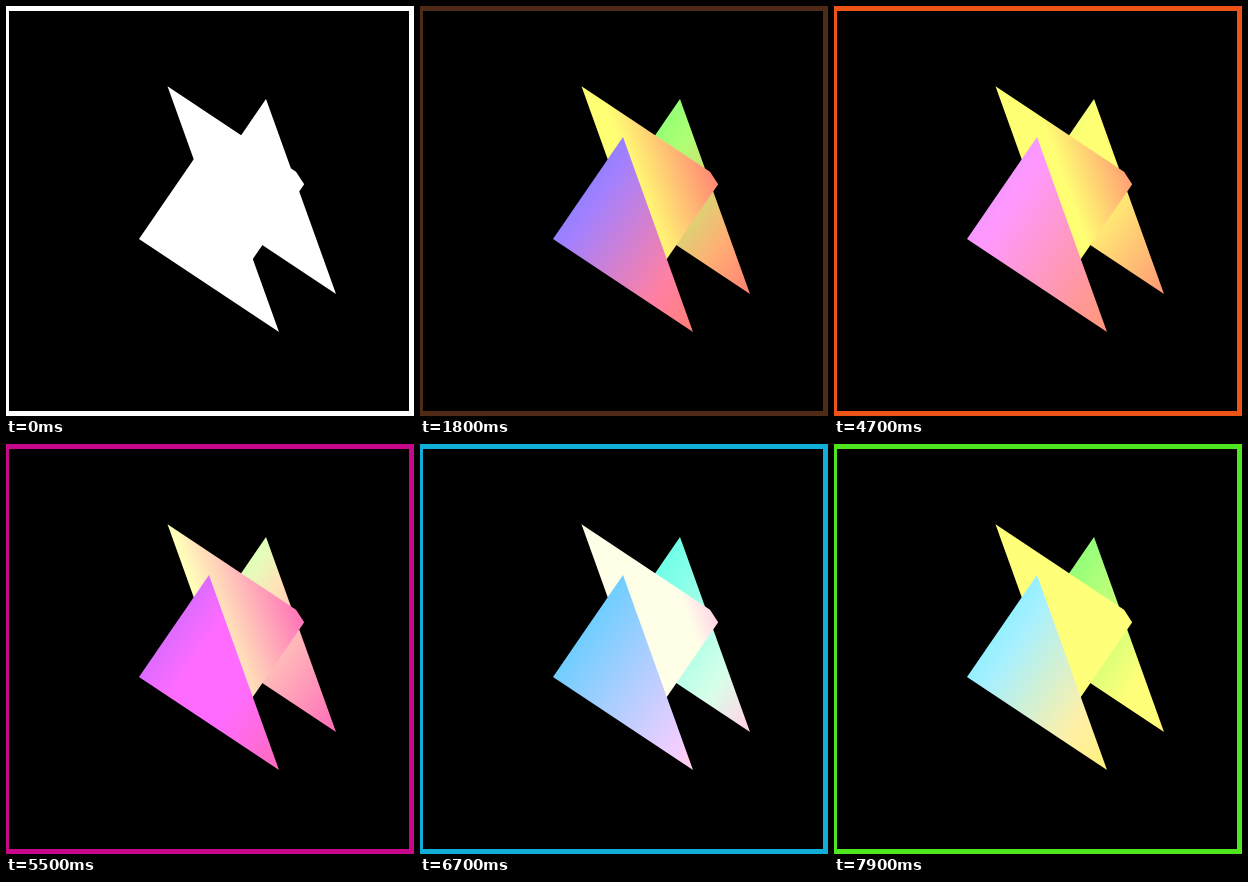
These frames come from a looping animation (408x410 px, 8000 ms). An HTML page with a canvas:

```html
<!DOCTYPE html>
<html lang="en">
<head>
<meta charset="utf-8">
<title>Tinted triangles</title>
<style>
html, body { margin: 0; width: 100%; height: 100%; overflow: hidden; }
canvas { display: block; }
</style>
</head>
<body>
<canvas id="stage" width="408" height="410"></canvas>
<script>
const ctx = document.getElementById('stage').getContext('2d');
const LOOP = 8000, TICK = 100;

// Bursts of tint changes: [start ms, number of ticks]
const bursts = [[1100, 4], [2300, 5], [4700, 4], [5500, 5], [6200, 4], [6700, 5], [7800, 2]];

// Tint by tick count: [tick, hue, saturation, value]
const tints = [
  [0, 21, 0, 1],
  [4, 21, 0.71, 0.31],
  [9, 23, 0.946, 0.87],
  [10, 16.5, 0.9, 0.933],
  [14, -41, 0.96, 0.784],
  [23, -167.2, 0.926, 0.85],
  [29, -254, 0.865, 0.902]
];

const GREEN = [0.4, 1, 0.4], YELLOW = [1, 1, 0.4], BLUE = [0.4, 0.4, 1], RED = [1, 0.4, 0.4];

// Orthographic view of model space
const project = (x, y, z) => [203 + 140 * x - 142.5 * z, 205.25 + 93 * x - 148.5 * y + 95 * z];

// Two corners share a colour, the last one is the red tip
const triangle = (z, color, pts) => ({ color, pts: pts.map(([x, y]) => project(x, y, z)) });
const triangles = [
  triangle(-0.4, GREEN, [[0, 0.5], [-0.5, -0.5], [0.5, -0.5]]),
  triangle(-0.2, YELLOW, [[-0.5, 0.4], [0, -0.6], [0.5, 0.4]]),
  triangle(0, BLUE, [[0, 0.5], [-0.5, -0.5], [0.5, -0.5]])
];

// The near plane cuts off the tip of the middle triangle
const [m0, m1] = triangles[1].pts;
triangles[1].outline = [m0, m1, [298.2, 178.2], [290, 165.7]];

const mix = (a, b, k) => a + (b - a) * k;

function ticksAt(t) {
  return bursts.reduce((n, [start, count]) =>
    n + Math.max(0, Math.min(count, Math.floor((t - start) / TICK) + 1)), 0);
}

function hsv(h, s, v) {
  return [5, 3, 1].map(n => {
    const k = (((n + h / 60) % 6) + 6) % 6;
    return v - v * s * Math.max(0, Math.min(k, 4 - k, 1));
  });
}

function tintAt(tick) {
  const i = Math.max(1, tints.findIndex(key => key[0] >= tick));
  const a = tints[i - 1], b = tints[i];
  const k = (tick - a[0]) / (b[0] - a[0]);
  return hsv(...[1, 2, 3].map(c => mix(a[c], b[c], k)));
}

const css = rgb => `rgb(${rgb.map(c => Math.round(255 * Math.min(1, c))).join(',')})`;

function drawTriangle({ color, pts, outline = pts }, tint) {
  const [a, b, tip] = pts;
  const ex = b[0] - a[0], ey = b[1] - a[1];
  const k = ((tip[0] - a[0]) * ex + (tip[1] - a[1]) * ey) / (ex * ex + ey * ey);
  const fill = ctx.createLinearGradient(a[0] + ex * k, a[1] + ey * k, tip[0], tip[1]);
  // Many stops, because each channel saturates at its own place
  for (let i = 0; i <= 48; i++) {
    fill.addColorStop(i / 48, css(color.map((c, n) => mix(c, RED[n], i / 48) + 0.6 * tint[n])));
  }
  ctx.fillStyle = fill;
  ctx.beginPath();
  outline.forEach(p => ctx.lineTo(p[0], p[1]));
  ctx.closePath();
  ctx.fill();
}

function draw(tick) {
  const tint = tintAt(tick);
  ctx.fillStyle = css(tint);
  ctx.fillRect(0, 0, 408, 410);
  ctx.fillStyle = '#000';
  ctx.fillRect(3, 5, 400, 400);
  triangles.forEach(t => drawTriangle(t, tint));
}

const begin = performance.now();
let shown = 0;

function frame() {
  const tick = ticksAt((performance.now() - begin) % LOOP);
  if (tick !== shown) draw(shown = tick);
  requestAnimationFrame(frame);
}

draw(shown);
requestAnimationFrame(frame);
</script>
</body>
</html>
```
